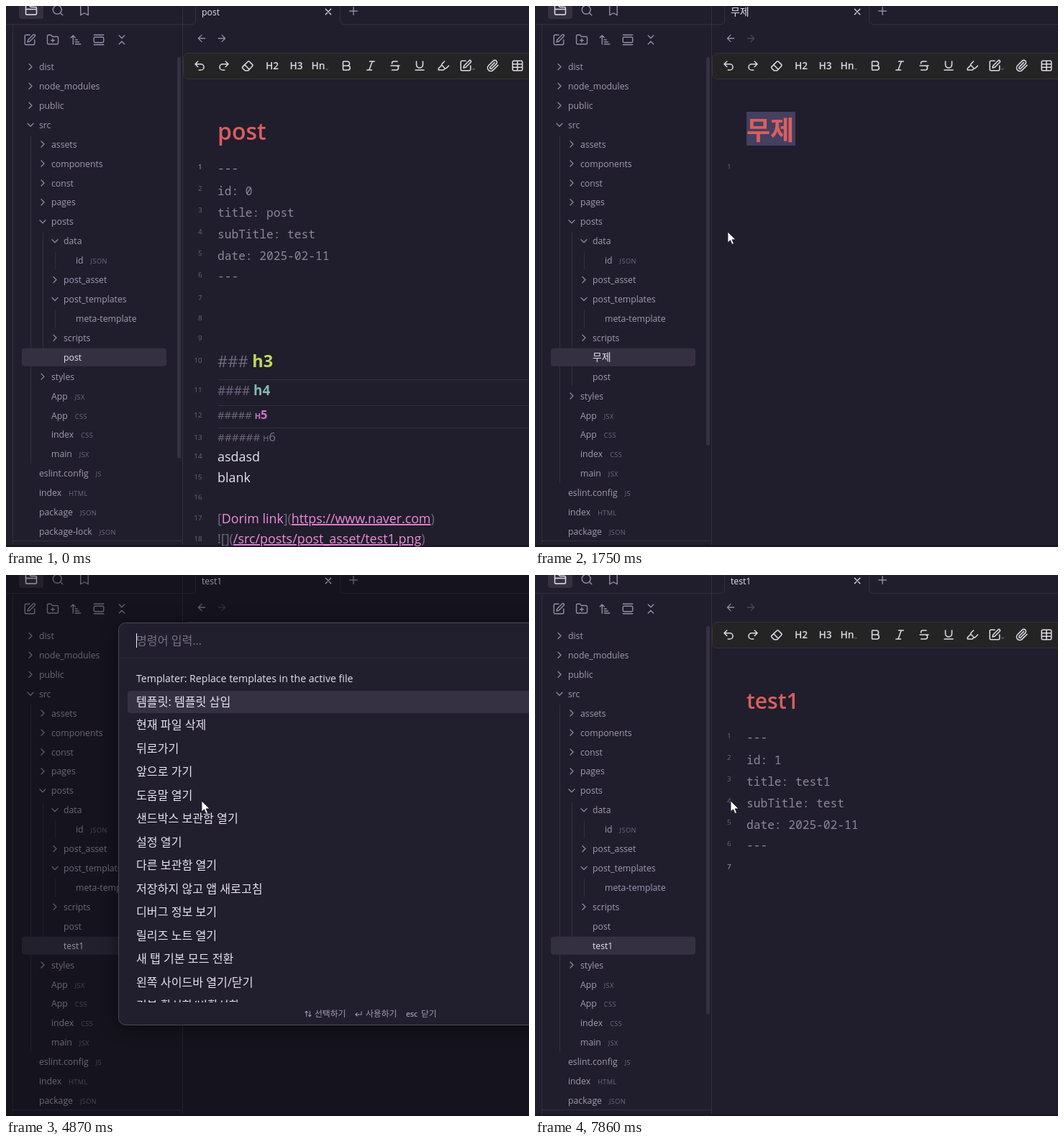
An HTML page for the animation above (8 s loop, 727 by 752 pixels).

```html
<!DOCTYPE html>
<html lang="ko">
<head>
<meta charset="utf-8">
<title>Note templates</title>
<style>
html, body { margin: 0; width: 100%; height: 100%; overflow: hidden; background: #201d2c; }
svg { display: block; width: 727px; height: 752px; }
text { font-family: 'Open Sans', 'Noto Sans CJK KR', 'Noto Sans CJK', sans-serif; white-space: pre; }
.mono { font-family: 'Noto Sans Mono', 'DejaVu Sans Mono', monospace; font-weight: 500; }
.icon { fill: none; stroke-linecap: round; stroke-linejoin: round; }
</style>
</head>
<body>
<svg id="stage" viewBox="0 0 727 752"></svg>
<script>
const LOOP = 8000;
const BG = '#211e2d', LINE = '#332f40', ACTIVE = '#343042', GRAY = '#a19bb2', DIM = '#6f6a80',
  WHITE = '#e6e2f0', CODE = '#8d879e', RED = '#d95f5f', PINK = '#f08cdc',
  GOLD = '#f0be72', AQUA = '#9fd3d6', MEDIUM = 'font-weight="500"';

const SHUT = 'M20 20a2 2 0 0 0 2-2V8a2 2 0 0 0-2-2h-7.9a2 2 0 0 1-1.7-.9L9.6 3.9A2 2 0 0 0 7.9 3H4a2 2 0 0 0-2 2v13a2 2 0 0 0 2 2z';
const ICON = {
  pen: 'M12 3H5a2 2 0 0 0-2 2v14a2 2 0 0 0 2 2h14a2 2 0 0 0 2-2v-7M18.4 2.6a2 2 0 0 1 3 3L12 15l-4 1 1-4z',
  files: SHUT + 'M2 10h20',
  addFolder: SHUT + 'M12 10v6M9 13h6',
  folder: 'M6 14l1.5-2.9A2 2 0 0 1 9.2 10H20a2 2 0 0 1 1.9 2.5l-1.5 6a2 2 0 0 1-2 1.5H4a2 2 0 0 1-2-2V5a2 2 0 0 1 2-2h3.9a2 2 0 0 1 1.7.9l.8 1.2a2 2 0 0 0 1.7.9H18a2 2 0 0 1 2 2v2',
  search: 'M11 3a8 8 0 1 0 0 16a8 8 0 1 0 0-16M21 21l-4.3-4.3',
  bookmark: 'M19 21l-7-4-7 4V5a2 2 0 0 1 2-2h10a2 2 0 0 1 2 2z',
  sort: 'M3 8l4-4 4 4M7 4v16M11 12h4M11 16h7M11 20h10',
  gallery: 'M3 3h18M3 21h18M5 7h14a2 2 0 0 1 2 2v6a2 2 0 0 1-2 2H5a2 2 0 0 1-2-2V9a2 2 0 0 1 2-2',
  collapse: 'M7 20l5-5 5 5M7 4l5 5 5-5',
  back: 'M12 19l-7-7 7-7M19 12H5',
  forward: 'M12 5l7 7-7 7M5 12h14',
  close: 'M18 6L6 18M6 6l12 12',
  plus: 'M5 12h14M12 5v14',
  undo: 'M9 14L4 9l5-5M4 9h10.5a5.5 5.5 0 0 1 0 11H11',
  redo: 'M15 14l5-5-5-5M20 9H9.5a5.5 5.5 0 0 0 0 11H13',
  eraser: 'M7 21l-4.3-4.3a2 2 0 0 1 0-2.8l9.6-9.6a2 2 0 0 1 2.8 0l5.6 5.6a2 2 0 0 1 0 2.8L13 21zM6 10l9 9',
  bold: 'M6 12h9a4 4 0 0 1 0 8H7a1 1 0 0 1-1-1V5a1 1 0 0 1 1-1h7a4 4 0 0 1 0 8',
  italic: 'M19 4h-9M14 20H5M15 4L9 20',
  strike: 'M16 4H9a3 3 0 0 0-2.8 4M14 12a4 4 0 0 1 0 8H6M4 12h16',
  underline: 'M6 4v6a6 6 0 0 0 12 0V4M4 20h16',
  marker: 'M9 11l-6 6v3h9l3-3M22 12l-4.6 4.6a2 2 0 0 1-2.8 0l-5.2-5.2a2 2 0 0 1 0-2.8L14 4',
  clip: 'M21.4 11l-9.2 9.2a6 6 0 0 1-8.5-8.5l8.6-8.5a4 4 0 1 1 5.7 5.6L9.4 17.4a2 2 0 0 1-2.8-2.8l8.5-8.5',
  table: 'M5 3h14a2 2 0 0 1 2 2v14a2 2 0 0 1-2 2H5a2 2 0 0 1-2-2V5a2 2 0 0 1 2-2M3 9h18M3 15h18M12 3v18',
  canvas: 'M3 3h7v9H3zM14 3h7v5h-7zM14 12h7v9h-7zM3 16h7v5H3z',
  nib: 'M15 22l-3-3 7-7 3 3zM18 13l-1.4-7L2 2l4 14.6 7 1.4M2.3 2.3l7.3 7.3M11 9a2 2 0 1 0 0 4a2 2 0 1 0 0-4',
  copy: 'M15 2H9a2 2 0 0 0-2 2v12a2 2 0 0 0 2 2h9a2 2 0 0 0 2-2V7zM15 2v5h5M3 8v12a2 2 0 0 0 2 2h10',
  tree: 'M13 10h8V5h-5l-1-2h-2zM13 21h8v-5h-5l-1-2h-2zM3 3v15h10M3 7h10',
  findIn: 'M10.7 20H4a2 2 0 0 1-2-2V5a2 2 0 0 1 2-2h3.9a2 2 0 0 1 1.7.9l.8 1.2a2 2 0 0 0 1.7.9H20a2 2 0 0 1 2 2v4M17 14a3 3 0 1 0 0 6a3 3 0 1 0 0-6M21 21l-1.5-1.5',
  arrow: 'M7 7h10v10M7 17L17 7',
  pencil: 'M12 20h9M16.4 3.6a2 2 0 0 1 3 3L7.4 18.6 3 20l1-4.4z',
  trash: 'M3 6h18M19 6v14a2 2 0 0 1-2 2H7a2 2 0 0 1-2-2V6M8 6V4a2 2 0 0 1 2-2h4a2 2 0 0 1 2 2v2M10 11v6M14 11v6',
  upDown: 'M3 8l4-4 4 4M7 4v16M13 16l4 4 4-4M17 20V4',
  enter: 'M8 9l-5 5 5 5M3 14h18V5'
};

// Drawing helpers
const esc = s => s.replace(/&/g, '&amp;').replace(/</g, '&lt;');
const fit = (s, size) => size * (/[가-힣]/.test(s) ? 1.075 : .943);
const rect = (x, y, w, h, fill, r = 0, more = '') =>
  `<rect x="${x}" y="${y}" width="${w}" height="${h}" rx="${r}" fill="${fill}" ${more}/>`;
const path = (d, color, width = 1, more = '') =>
  `<path class="icon" d="${d}" stroke="${color}" stroke-width="${width}" ${more}/>`;
const icon = (name, x, y, size, color, width = 1.9) =>
  path(ICON[name], color, width, `transform="translate(${x - size / 2} ${y - size / 2}) scale(${size / 24})"`);
const span = (s, fill, more = '') => `<tspan fill="${fill}" ${more}>${esc(s)}</tspan>`;
const line = (x, y, size, body, more = '') => `<text x="${x}" y="${y}" font-size="${size}" ${more}>${body}</text>`;
const text = (x, y, s, size, fill, more) => line(x, y, fit(s, size), span(s, fill), more);
const caret = (x, y, h) => rect(x, y, 1, h, '#f4f1fa');

// Each entry: depth, mark (> closed, v open, - file), name, optional badge
const tree = files => [
  '0>dist', '0>node_modules', '0>public', '0vsrc', '1>assets', '1>components', '1>const', '1>pages',
  '1vposts', '2vdata', '3-id JSON', '2>post_asset', '2vpost_templates', '3-meta-template', '2>scripts',
  ...files.map(f => '2-' + f), '1>styles', '1-App JSX', '1-App CSS', '1-index CSS', '1-main JSX',
  '0-eslint.config JS', '0-index HTML', '0-package JSON', '0-package-lock JSON'
].slice(0, 25).map(s => {
  const [name, badge] = s.slice(2).split(' ');
  return { depth: +s[0], mark: s[1], name, badge };
});
const rowY = i => 84.4 + 26.92 * i;

function sidebar(t, note, mouse) {
  const rows = tree(note === 'post' ? ['post'] : note === '무제' ? ['무제', 'post'] : ['post', 'test1']);
  const hover = t > 70 && t < 1030 && mouse.x > 22 && mouse.x < 223 ? Math.round((mouse.y + 4 - 84.4) / 26.92) : -1;
  let out = rect(238, 71, 5, note === 'post' ? 558 : 540, '#353140', 2.5);
  rows.forEach((row, i) => {
    const y = rowY(i), x = 46 + 17 * row.depth, on = row.name === note && row.depth === 2;
    if (on || i === hover) out += rect(22, y - 12.4, 201, 25, on ? ACTIVE : '#2b2838', 4);
    if (row.mark === 'v') {
      let end = i;
      while (rows[end + 1] && rows[end + 1].depth > row.depth) end++;
      out += rect(x - 12, y + 15, 1, rowY(end) - y - 2, LINE);
    }
    if (row.mark !== '-')
      out += path(row.mark === 'v' ? 'M-4-2l4 4 4-4' : 'M-2-4l4 4-4 4', '#8b859b', 1.4, `transform="translate(${x - 12} ${y})"`);
    out += line(x, y + 4.6, fit(row.name, 13), span(row.name, on || i === hover ? WHITE : GRAY, on ? MEDIUM : '') +
      (row.badge ? span(row.badge, DIM, 'dx="10" font-size="9.2" letter-spacing=".4"') : ''));
  });
  ['pen', 'addFolder', 'sort', 'gallery', 'collapse'].forEach((n, i) => out += icon(n, 33 + 32 * i, 47, 18, '#938da4'));
  return out;
}

function frame(note) {
  let out = rect(18, -6, 34, 24, '#353141', 4) + icon('files', 35, 6, 18, WHITE) +
    icon('search', 72, 6, 18, '#938da4') + icon('bookmark', 109, 6, 18, '#938da4') +
    path('M0 25.5H258Q263.5 25.5 263.5 20V0M464.5 0V20Q464.5 25.5 470 25.5H727M245.5 0V752M9.5 26V752M10 743.5H245', LINE) +
    text(272, 13, note, 13, WHITE, MEDIUM) + icon('close', 448, 8, 15, WHITE) + icon('plus', 483, 7, 18, '#938da4') +
    icon('back', 272, 45, 16, '#938da4') + icon('forward', 300, 45, 16, note === 'post' ? '#938da4' : '#4b4658') +
    rect(246.5, 65.5, 500, 36, '#242424', 7, 'stroke="#353338"') + rect(0, 749, 727, 3, '#1b1825');
  const tools = { undo: 269, redo: 303, eraser: 336, bold: 473, italic: 507, strike: 541, underline: 575, marker: 608, pen: 639, clip: 677, table: 711 };
  for (const n in tools) out += icon(n, tools[n], 83, 18, '#dedae6', 2.1);
  ['H2', 'H3', 'Hn'].forEach((s, i) => out += text([361, 394.5, 424.5][i], 88, s, 14.5, '#dedae6', 'font-weight="600"'));
  return out + path('M444.5 87l1.5 1.5 1.5-1.5M648.5 87l1.5 1.5 1.5-1.5', '#8b8793');
}

const number = (n, y, on) => line(272.5, y + 3.6, 9.8, span('' + n, on ? '#aaa4b8' : '#6b667a'), 'text-anchor="end"');
const mono = (y, body) => line(294, y, 16.2, body, 'class="mono"');
const numbers = (count, on) => {
  const tops = [223, 253, 283, 313, 343, 373, 405, 433, 461, 492, 533, 568, 599, 625, 654, 682, 711, 740];
  return tops.slice(0, count).map((y, i) => number(i + 1, y, i + 1 === on)).join('');
};
const meta = (id, title) => ['---', 'id: ' + id, 'title: ' + title, 'subTitle: test', 'date: 2025-02-11', '---']
  .map((s, i) => mono([231, 263, 293, 323, 353, 381][i], span(s, CODE))).join('');

function postBody() {
  const heading = (y, hashes, size, name, color, big, more = 'font-weight="700"') =>
    line(294, y, size, span(hashes + ' ', DIM) + span(name, color, `font-size="${big}" ${more}`));
  const caps = 'font-variant="small-caps"';
  return meta(0, 'post') + numbers(18, 1) +
    heading(502, '###', 22, 'h3', '#bdd95f', 23.5) + heading(541, '####', 17.6, 'h4', '#84b9b0', 18.8) +
    heading(574, '#####', 14.8, 'h5', '#cd77c8', 16.4, caps + ' font-weight="700"') +
    heading(605, '######', 15.3, 'h6', '#7d788f', 16.4, caps) +
    [519, 555, 586].map(y => rect(294, y, 433, 1, LINE)).join('') +
    text(294, 633, 'asdasd', 19, WHITE) + text(294, 662, 'blank', 19, WHITE) +
    line(294, 719, 17.8, span('[', DIM) + span('Dorim link', PINK) + span('](', DIM) +
      span('https://www.naver.com', PINK, 'text-decoration="underline"') + span(')', DIM)) +
    line(294, 747, 17.9, span('![](', DIM) +
      span('/src/posts/post_asset/test1.png', PINK, 'text-decoration="underline"') + span(')', DIM));
}

function templateBody() {
  const code = (y, key, parts) => {
    const length = parts.reduce((n, p) => n + p[0].length, 0), x = 294 + key.length * 9.72;
    return rect(x, y - 15, length * 9.46, 20, '#1a1823') + mono(y, span(key, CODE) +
      parts.map(p => span(p[0], p[1], 'font-size="15.77" font-weight="' + (p[2] || 700) + '"')).join(''));
  };
  return [231, 381].map(y => mono(y, span('---', CODE))).join('') +
    code(263, 'id: ', [['<%* ', GOLD], ['tR ', AQUA], ['+= ', RED], ['await ', '#c3bbe2'], ['tp', AQUA], ['.', WHITE],
      ['user', GOLD], ['.', WHITE], ['idIncrement', GOLD], ['(); ', WHITE], ['%>', GOLD]]) +
    code(293, 'title: ', [['<% tp', AQUA], ['.', WHITE], ['file', GOLD], ['.', WHITE], ['title ', GOLD], ['%>', AQUA]]) +
    mono(323, span('subTitle: test', CODE)) +
    code(353, 'date: ', [['<% tp', AQUA], ['.', WHITE], ['date', GOLD], ['.', WHITE], ['now', GOLD], ['(', WHITE],
      ['"YYYY-MM-DD"', '#4a7f96', 400], [') ', WHITE], ['%>', AQUA]]);
}

const KEYS = [2270, 2460, 2580, 2700, 2860];
function editor(t) {
  const heading = (s, size) => line(294, 186, size, span(s, RED), 'font-weight="600"');
  if (t < 1450) return heading('post', 32) + postBody();
  if (t < 2270) return rect(294, 147, 68, 47, '#453f60') + heading('무제', 36) + numbers(1);
  const typed = KEYS.filter(k => t >= k).length;
  let out = heading('test1'.slice(0, typed), 30);
  if (t < 3370) out += caret([306, 324, 338, 350, 364][typed - 1], 147, 47);
  if (t < 5610) return out + numbers(1, 1) + (t >= 3560 && t < 3880 ? caret(294, 212, 26) : '');
  out += numbers(7, 7) + (t < 7340 ? templateBody() : meta(1, 'test1'));
  const blink = t < 6120 || t >= 7340 && t < 7860;
  return out + (blink ? caret(294, 392, 26) : '');
}

function menu(t) {
  if (t < 770 || t >= 1410) return '';
  const items = [
    [312, 'pen', '새 노트'], [337, 'folder', '새 폴더'], [362, 'canvas', '새 캔버스'], [387, 'nib', 'New drawing'],
    [425, 'copy', '복사본 생성'], [449, 'tree', '폴더 이동...'], [474, 'findIn', '폴더에서 검색'], [499, 'bookmark', '북마크...'],
    [537, 'arrow', '폴더에서 보기'], [575, '', 'Create new note from template'], [613, 'pencil', '이름 변경'], [638, 'trash', '삭제']
  ];
  let out = rect(141.5, 293.5, 233, 364, BG, 8, 'stroke="#413d50" style="filter:drop-shadow(0 4px 10px #0008)"');
  if (t > 1110) out += rect(148, 300, 220, 25, '#363241', 4);
  for (const [y, name, label] of items) {
    const danger = name === 'trash';
    out += name ? icon(name, 164, y, 16, danger ? '#c9587f' : '#a09aaf') : text(156, y + 4, '<%', 11, '#a09aaf');
    out += text(180, y + 4.7, label, 13, danger ? '#c9587f' : WHITE, MEDIUM);
  }
  out += [406, 518, 556, 594].map(y => rect(148, y, 220, 1, '#383445')).join('');
  return rect(21, 286, 203, 27, 'none', 4, 'stroke="#575264" stroke-width="2"') +
    `<g opacity="${Math.min(1, (t - 740) / 150)}">${out}</g>`;
}

const COMMANDS = ['현재 파일 삭제', '뒤로가기', '앞으로 가기', '도움말 열기', '샌드박스 보관함 열기', '설정 열기',
  '다른 보관함 열기', '저장하지 않고 앱 새로고침', '디버그 정보 보기', '릴리즈 노트 열기', '새 탭 기본 모드 전환',
  '왼쪽 사이드바 열기/닫기', '리본 활성화/비활성화'];

function modal(t) {
  const first = t >= 3880 && t < 5610, second = t >= 6480 && t < 7340;
  if (!first && !second) return '';
  const picker = first && t >= 4920;
  const top = ['Templater: Replace templates in the active file', '템플릿: 템플릿 삽입'];
  const items = picker ? ['meta-template'] : [...(second ? top.reverse() : top), ...COMMANDS];
  const chosen = !picker && (second ? t >= 7050 : t >= 4330) ? 1 : 0;
  const blink = second ? t < 6980 : t < 4350 || t >= 4870 && t < 5430;
  const bottom = picker ? 205 : 626, hint = '#a39db3';
  let out = rect(0, 0, 727, 752, '#000', 0, 'opacity=".34"') +
    rect(156.5, 66.5, 700, bottom - 67, BG, 10, 'stroke="#4b4759" style="filter:drop-shadow(0 4px 12px #0007)"') +
    rect(157, 115, 570, 1, '#2d2a3a') +
    text(181, 96.5, picker ? '템플릿 이름 입력...' : '명령어 입력...', 15, '#787288') +
    (blink ? caret(181, 81, 20) : '') + rect(169, 129 + 32 * chosen, 600, 31, '#353143', 4);
  out += `<clipPath id="list"><rect x="157" y="116" width="570" height="${bottom - 148}"/></clipPath><g clip-path="url(#list)">` +
    items.map((s, i) => text(181, 149 + 32.5 * i, s, 15, WHITE, MEDIUM)).join('') + '</g>';
  [[429, '선택하기'], [500, '사용하기'], [577, '닫기']].forEach(([x, s]) => out += text(x, bottom - 12, s, 11, hint));
  return out + icon('upDown', 420, bottom - 16, 11, hint, 2.2) + icon('enter', 490, bottom - 16, 11, hint, 2.2) +
    text(556, bottom - 12, 'esc', 11, hint, 'font-weight="600"');
}

// Pointer stops: time, x, y
const STOPS = [[70, 660, 718], [590, 140, 293], [1030, 140, 293], [1160, 200, 312], [1520, 200, 312], [1790, 272, 314]];
function pointer(t) {
  const i = STOPS.findIndex(s => s[0] > t);
  if (i < 1) { const [, x, y] = STOPS[i < 0 ? STOPS.length - 1 : 0]; return { x, y }; }
  const [a, b] = [STOPS[i - 1], STOPS[i]], p = (t - a[0]) / (b[0] - a[0]), e = p * p * (3 - 2 * p);
  return { x: a[1] + (b[1] - a[1]) * e, y: a[2] + (b[2] - a[2]) * e };
}
const arrow = m => `<path transform="translate(${m.x} ${m.y})" d="M0 0V15l3.5-3.2 2.5 5.7 2.5-1.1-2.5-5.5h5z" fill="#fff" stroke="#15131c" stroke-width=".8"/>`;

function scene(t) {
  const note = t < 1450 ? 'post' : t < 3545 ? '무제' : 'test1', mouse = pointer(t);
  return frame(note) + sidebar(t, note, mouse) + editor(t) + menu(t) + modal(t) + (t >= 70 ? arrow(mouse) : '');
}

const stage = document.getElementById('stage');
let shown = '';
function tick() {
  const next = scene(performance.now() % LOOP);
  if (next !== shown) stage.innerHTML = shown = next;
  requestAnimationFrame(tick);
}
tick();
</script>
</body>
</html>
```
